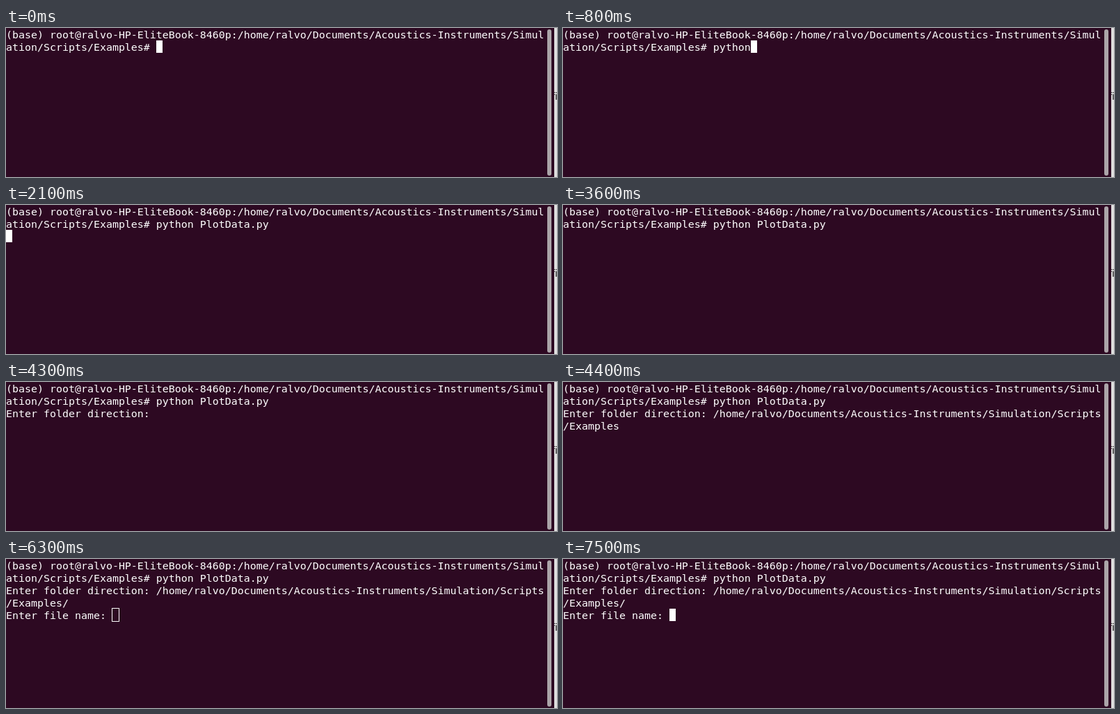
Animation, 792 px wide and 216 px high, one loop 8 s. Source, as an HTML page:

```html
<!DOCTYPE html>
<html lang="en">
<head>
<meta charset="utf-8">
<title>Terminal session</title>
<style>
  html, body { margin: 0; width: 100%; height: 100%; overflow: hidden; background: #2d0922; }
  #stage { position: relative; width: 792px; height: 216px; overflow: hidden; }
  #stage > * { position: absolute; box-sizing: border-box; }
  #screen {
    left: 0; top: 1px; margin: 0; color: #fff; white-space: pre;
    font: 14.95px/18px "DejaVu Sans Mono", monospace; /* 9px cell width */
    font-variant-ligatures: none;
  }
  #cursor { width: 9px; height: 18px; background: #fff; }
  #cursor.off { visibility: hidden; }
  #cursor.hollow { width: 11px; height: 20px; margin: -1px; background: none; border: 1px solid #fff; }
  #scrollbar { left: 778px; top: 2px; width: 6px; height: 212px; border-radius: 3px; background: #aba5a9; }
  #behind { left: 788px; top: 0; width: 4px; height: 216px; overflow: hidden; background: #dedede; }
  #behind span {
    position: absolute; left: -3px; top: 90px; color: #222;
    font: 15px/18px "Liberation Sans", sans-serif; font-variant-ligatures: none;
  }
</style>
</head>
<body>
<div id="stage">
  <pre id="screen"></pre>
  <div id="cursor"></div>
  <div id="scrollbar"></div>
  <div id="behind"><span>fi</span></div>
</div>
<script>
  const LOOP = 8000, CELL_W = 9, CELL_H = 18, COLS = 86;
  const screen = document.getElementById("screen");
  const cursor = document.getElementById("cursor");

  const root = "/home/ralvo/Documents/Acoustics-Instruments/Simulation/Scripts";
  const prompt = `(base) root@ralvo-HP-EliteBook-8460p:${root}/Examples# `;
  const run = prompt + "python PlotData.py\n";
  const askFolder = run + "Enter folder direction: ";
  const pasted = askFolder + root + "/Examples";
  const askFile = pasted + "/\nEnter file name: ";

  // [start ms, text, cursor style]
  const steps = [
    [0, prompt, ""],
    [500, prompt + "py", ""],
    [600, prompt + "pyt", ""],
    [800, prompt + "python", ""],
    [1100, prompt + "python ", ""],
    [1300, prompt + "python P", ""],
    [1400, prompt + "python Pl", ""],
    [1600, prompt + "python PlotData.py ", ""],
    [2100, run, ""],
    [2700, run, "off"],
    [2900, run, ""],
    [3600, run, "off"],
    [3700, askFolder, "off"],
    [3800, askFolder, ""],
    [4300, askFolder, "off"],
    [4400, pasted, "off"],
    [4900, pasted, ""],
    [5100, pasted + "/", ""],
    [5400, askFile, ""],
    [6000, askFile, "off"],
    [6300, askFile, "hollow"],
    [7500, askFile, ""]
  ];

  const wrap = text => text.split("\n").flatMap(line => {
    const rows = [];
    do {
      rows.push(line.slice(0, COLS));
      line = line.slice(COLS);
    } while (line);
    return rows;
  });

  let shown;

  function draw() {
    const time = performance.now() % LOOP;
    const step = steps.findLast(([start]) => start <= time);
    if (step !== shown) {
      const [, text, style] = shown = step;
      const rows = wrap(text);
      screen.textContent = rows.join("\n");
      cursor.className = style;
      cursor.style.left = rows.at(-1).length * CELL_W + "px";
      cursor.style.top = (rows.length - 1) * CELL_H + "px";
    }
    requestAnimationFrame(draw);
  }
  draw();
</script>
</body>
</html>
```
